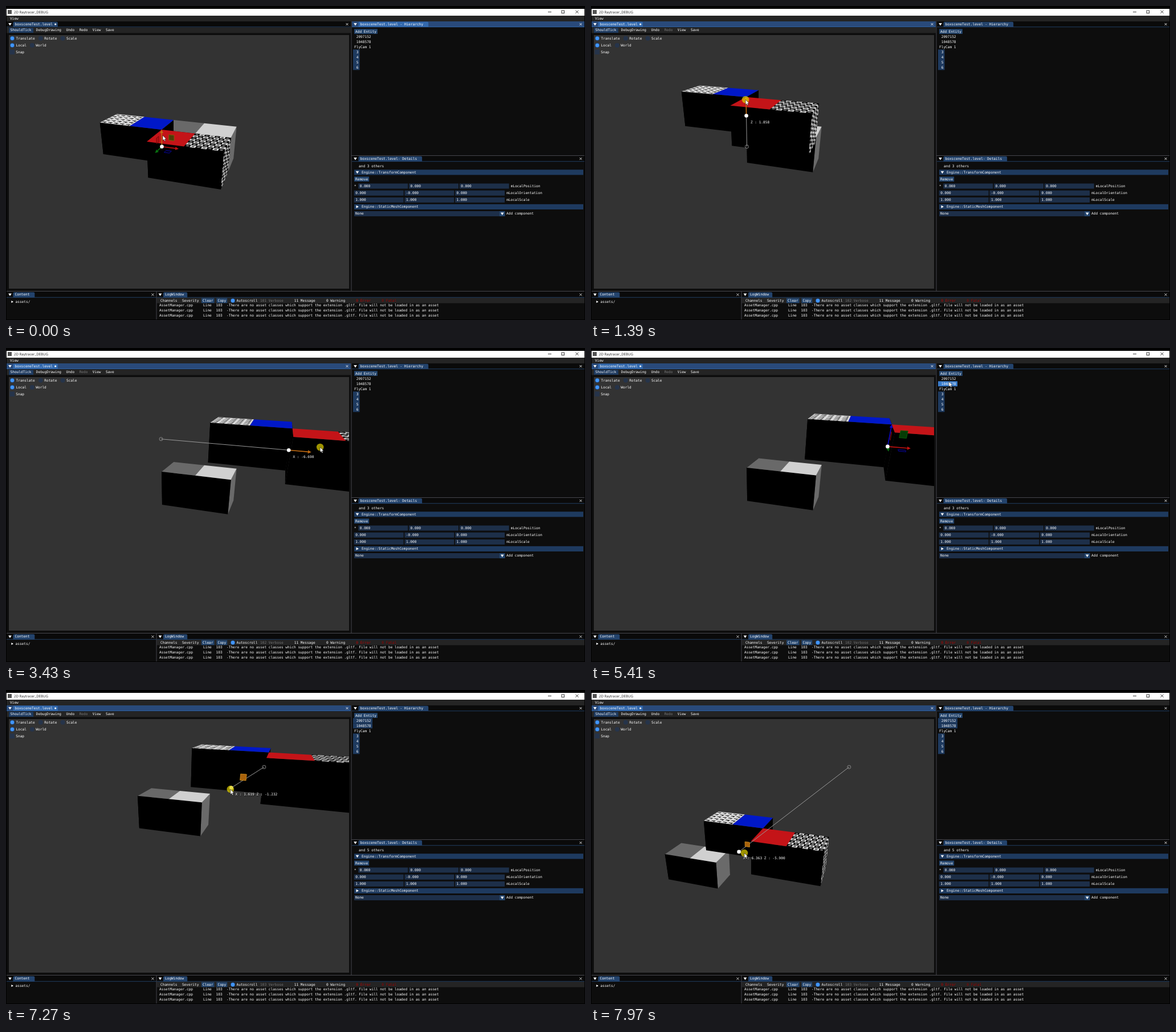
Recreate the animation shown at these times as an HTML page with a canvas. Size 1016 by 551 pixels, loop 8000 ms.

```html
<!DOCTYPE html>
<html lang="en">
<head>
<meta charset="utf-8">
<title>Level editor</title>
<style>
html, body { margin: 0; width: 100%; height: 100%; overflow: hidden; background: #000; }
canvas { display: block; }
</style>
</head>
<body>
<canvas id="stage" width="1016" height="551"></canvas>
<script>
const ctx = document.getElementById('stage').getContext('2d');
const MONO = '6.13px "DejaVu Sans Mono", monospace', CHAR = 3.69;
const FRAME = '#1d2f49', BUTTON = '#24456d', HEADER = '#1e3a5f', TAB = '#23436c', MENU = '#242424', HOT = '#c06a12';
const LOOP = 8000;

// ---------- timing ----------
const ramp = (t, from, to) => Math.min(1, Math.max(0, (t - from) / (to - from)));
const linear = p => p;
const easeOut = p => Math.sin(p * Math.PI / 2);
const LIFT = [710, 2250], SLIDE = [2720, 3690], FLY = [5410, 6200], PLANE = [6950, 7970];
const within = (t, [from, to]) => t >= from && t < to;

// ---------- drawing helpers ----------
function rect(x, y, w, h, color) {
  ctx.fillStyle = color;
  ctx.fillRect(x, y, w, h);
}
function text(s, x, y, color = '#fff', font = MONO) {
  ctx.font = font;
  ctx.fillStyle = color;
  ctx.fillText(s, x, y + .3);
}
// labels side by side; visit(label, x) draws one
function row(labels, x, gap, visit) {
  for (const label of labels) {
    visit(label, x);
    x += label.length * CHAR + gap;
  }
}
function poly(points, color, stroke, width = 1) {
  ctx.beginPath();
  points.forEach(p => ctx.lineTo(...p));
  ctx.closePath();
  ctx.fillStyle = color;
  ctx.fill();
  if (!stroke) return;
  ctx.strokeStyle = stroke;
  ctx.lineWidth = width;
  ctx.stroke();
}
function line(a, b, color, width = 1) {
  ctx.beginPath();
  ctx.moveTo(...a);
  ctx.lineTo(...b);
  ctx.strokeStyle = color;
  ctx.lineWidth = width;
  ctx.stroke();
}
function disc(x, y, r, color, outline) {
  ctx.beginPath();
  ctx.arc(x, y, r, 0, 7);
  ctx.lineWidth = 1;
  ctx.fillStyle = ctx.strokeStyle = color;
  outline ? ctx.stroke() : ctx.fill();
}
const down = (x, y) => poly([[x - 2.8, y - 2], [x + 2.8, y - 2], [x, y + 2.5]], '#fff');
const right = (x, y, r = 2.5) => poly([[x - r * .8, y - r], [x + r, y], [x - r * .8, y + r]], '#fff');
function cross(x, y, color = '#fff', r = 2) {
  line([x - r, y - r], [x + r, y + r], color, .8);
  line([x - r, y + r], [x + r, y - r], color, .8);
}
function button(label, x, y) {
  rect(x - 2, y - 4.4, label.length * CHAR + 4, 8.6, BUTTON);
  text(label, x, y);
}
function radio(label, x, y, on) {
  disc(x, y, 4, on ? '#1f4a80' : '#26344a');
  if (on) disc(x, y, 3.2, '#4296fa');
  text(label, x + 6.5, y);
}

// ---------- 3D scene, unit = one cube ----------
function project(u, v, z) {
  const w = 1 - .0293 * u - .106 * v - .053 * z;
  return [(273 + 49.3 * u - 52.2 * v - 15.5 * z) / w, (217 + .3 * u - 4.2 * v - 72.6 * z) / w];
}
const quad = (at, a0, b0, a1, b1, color) => poly([at(a0, b0), at(a1, b0), at(a1, b1), at(a0, b1)], color);
const flat = color => at => quad(at, 0, 0, 1, 1, color);
function cells(at, n, paint) {
  for (let i = 0; i < n; i++) for (let j = 0; j < n; j++)
    paint((a, b) => at((i + a) / n, (j + b) / n), (i + j) % 2);
}
function symbols(at) {
  flat('#dcdcdc')(at);
  cells(at, 5, cell => {
    quad(cell, .1, .35, .8, .58, '#111');
    quad(cell, .55, .58, .75, .85, '#111');
  });
}
function checker(at) {
  cells(at, 7, (cell, light) => {
    flat(light ? '#dcdcdc' : '#080808')(cell);
    quad(cell, .25, .35, .7, .65, light ? '#111' : '#ccc');
  });
}
function box([u, v, z], topLeft, topRight, side) {
  flat('#000')((a, b) => project(u, v + a, z - b));
  side((a, b) => project(u + 2, v + a, z - b));
  flat('#000')((a, b) => project(u + 2 * a, v + 1, z - b));
  topLeft((a, b) => project(u + a, v + b, z));
  topRight((a, b) => project(u + 1 + a, v + b, z));
}

function sceneAt(t) {
  const p = ramp(t, ...PLANE);
  const lift = 2.902 * easeOut(ramp(t, ...LIFT));
  const slide = 7.325 * easeOut(ramp(t, ...SLIDE));
  const planeX = 6.363 * p ** 1.184, planeZ = 5.9 * p ** 1.355;
  const fly = t < FLY[0] ? 0 : .11 + .89 * ramp(t, ...FLY);
  const world = [-.12 * fly - planeX * .5, -.4 * fly, .907 * fly - planeZ * .48];
  const moved = [slide * .5, 0, lift * .48];
  return { lift, slide, planeX, planeZ, world, moved };
}
const add = (a, b, k = 1) => a.map((n, i) => n + b[i] * k);

// ---------- transform gizmo ----------
function gizmo(pivot, mode, start, label) {
  const at = project(...pivot);
  const rel = (...d) => project(...add(pivot, d));
  const arrow = (end, color) => {
    const dx = end[0] - at[0], dy = end[1] - at[1], len = Math.hypot(dx, dy), x = dx / len, y = dy / len;
    const neck = [end[0] - 6 * x, end[1] - 6 * y];
    line(at, neck, color, 1.6);
    poly([end, add(neck, [-y, x], 3), add(neck, [y, -x], 3)], color);
  };
  const plane = (corner, fill, stroke) => {
    const lo = .22, hi = .38;
    poly([corner(lo, lo), corner(hi, lo), corner(hi, hi), corner(lo, hi)], fill, stroke, .9);
  };
  const xEnd = rel(.52, 0, 0), zEnd = rel(0, 0, .5), xz = (a, b) => rel(a, 0, b);
  if (start) {
    line(start, at, '#999');
    disc(...start, 3, '#888', true);
    if (mode === 'x') arrow(xEnd, HOT);
    if (mode === 'z') arrow(zEnd, HOT);
    if (mode === 'p') plane(xz, '#a8620c', '#c98a1c');
  } else {
    arrow(xEnd, mode === 'x' ? HOT : '#c01010');
    arrow(rel(0, .5, 0), '#087010');
    arrow(zEnd, mode === 'z' ? HOT : '#0808c8');
    plane((a, b) => rel(0, a, b), 'rgba(120,0,0,.2)', '#700808');
    plane((a, b) => rel(a, b, 0), 'rgba(0,0,120,.2)', '#0808a0');
    const hot = mode === 'z' || mode === 'p';
    plane(xz, hot ? '#4d3c08' : '#063c06', hot ? '#80600c' : '#0a600a');
  }
  disc(...at, 3.3, '#fff');
  if (label) {
    text(label, at[0] + 8, at[1] + 12.2, '#000');
    text(label, at[0] + 7.3, at[1] + 11.5);
  }
}

function viewport(t) {
  const { lift, slide, planeX, planeZ, world, moved } = sceneAt(t);
  const pair = add(world, moved);
  ctx.save();
  ctx.beginPath();
  ctx.rect(5, 51, 597, 445);
  ctx.clip();
  rect(5, 51, 597, 445, '#333');
  box(add(world, [0, -1, 0]), flat('#696969'), flat('#d0d0d0'), flat('#6a6a6a'));
  box(add(pair, [-2, -1, 0]), symbols, flat('#0018c8'), flat('#000'));
  box(pair, flat('#c41418'), checker, checker);

  // pivot = mean of the selected cubes: four at first, then all six
  const four = add(pair, [0, 0, -.5]);
  const six = (w, m) => add(add(w, m, 2 / 3), [1 / 3, -1 / 6, -.5]);
  const grab = sceneAt(PLANE[0]);
  if (within(t, [740, 2320])) gizmo(four, 'z', project(0, 0, -.5), `Z : ${lift.toFixed(3)}`);
  else if (within(t, [SLIDE[0], 4050])) gizmo(four, 'x', project(0, 0, moved[2] - .5), `X : ${(-slide).toFixed(3)}`);
  else if (t >= PLANE[0]) gizmo(six(world, moved), 'p', project(...six(grab.world, grab.moved)),
    `X : ${planeX.toFixed(3)} Z : ${(-planeZ).toFixed(3)}`);
  else gizmo(t < 5900 ? four : six(world, moved), t < 2500 ? 'z' : t < SLIDE[0] ? 'x' : t > 6600 ? 'p' : '');
  ctx.restore();
}

// ---------- mouse ----------
function mouseAt(t) {
  const legs = [
    [...LIFT, 269, 129, easeOut], [2390, 2660, 300, 163], [...SLIDE, 575, 175, easeOut], [4050, 4440, 628, 59],
    [6260, 6650, 480, 117], [PLANE[0], 7270, 394, 174], [7270, PLANE[1], 269, 286],
  ];
  let x = 275, y = 227;
  for (const [from, to, endX, endY, ease = linear] of legs) {
    const p = ease(ramp(t, from, to));
    x += (endX - x) * p;
    y += (endY - y) * p;
  }
  return [x, y];
}
function pointer(t) {
  const tip = mouseAt(t);
  if (within(t, [730, 2320]) || within(t, [SLIDE[0], 4050]) || t > PLANE[0]) disc(...tip, 6.3, 'rgba(220,205,0,.72)');
  const shape = [[0, 0], [0, 9], [2, 7.2], [3.4, 10.3], [4.9, 9.6], [3.6, 6.7], [6.2, 6.5]];
  poly(shape.map(p => add(p, tip)), '#fff', '#000', .5);
}

// ---------- panels ----------
function titleBar(label, x0, x1, y, focused, extra = 0) {
  const tab = focused ? '#3369ad' : TAB, width = label.length * CHAR + 9 + extra;
  rect(x0, y, x1 - x0, 10, focused ? '#294a7a' : '#0a0a0a');
  rect(x0, y + 9.3, x1 - x0, .9, tab);
  ctx.beginPath();
  ctx.roundRect(x0 + 11.5, y + .8, width, 9.2, [2, 2, 0, 0]);
  ctx.fillStyle = tab;
  ctx.fill();
  down(x0 + 6, y + 5);
  text(label, x0 + 14.5, y + 5);
  cross(x1 - 6.5, y + 5);
}
function levelPanel(t, focused) {
  titleBar('boxsceneTest.level', 1, 605, 27, focused, 3);
  disc(86.7, 32, 1.6, '#fff');
  rect(1, 37.5, 604, 10, MENU);
  rect(5, 38.5, 43, 8.5, HEADER);
  row(['ShouldTick', 'DebugDrawing', 'Undo', 'Redo', 'View', 'Save'], 7.5, 8.4,
    (s, x) => text(s, x, 42.5, s === 'Redo' && t >= 760 ? '#777' : '#fff'));
  viewport(t);
  row(['Translate', 'Rotate', 'Scale'], 11, 16.6, (s, x) => radio(s, x, 56.7, s === 'Translate'));
  row(['Local', 'World'], 11, 16.4, (s, x) => radio(s, x, 69, s === 'Local'));
  rect(6.5, 76.5, 8.5, 8.5, '#26344a');
  text('Snap', 17.3, 81);
}
function hierarchyPanel(t, focused) {
  titleBar('boxsceneTest.level - Hierarchy', 607, 1015, 27, focused, 3);
  button('Add Entity', 613, 44.7);
  if (t >= 5900) rect(609, 49.3, 34, 9, HEADER);
  if (t >= 4400) rect(609, 58.3, 34, 9, t < 5800 ? '#387bcb' : HEADER);
  rect(609, 76.3, 11.5, 36, HEADER);
  ['2097152', '1048578', 'FlyCam 1', '3', '4', '5', '6']
    .forEach((s, i) => text(s, i === 2 ? 611 : 614.7, 54 + 9 * i));
}
function component(label, y, open) {
  rect(611, y - 4.5, 402, 9.2, HEADER);
  open ? down(616.5, y) : right(616.5, y);
  text(label, 624, y);
}
function detailsPanel(t) {
  titleBar('boxsceneTest.level- Details', 607, 1015, 263, false, 3);
  text(`and ${t < 5500 ? 3 : t < 5900 ? 4 : 5} others`, 619, 281);
  component('Engine::TransformComponent', 291.7, true);
  button('Remove', 613, 303.8);
  text('*', 611, 316);
  ['mLocalPosition', 'mLocalOrientation', 'mLocalScale'].forEach((label, n) => {
    const x = n ? 610.7 : 618.3, y = 316 + 12.2 * n;
    for (let i = 0; i < 3; i++) {
      rect(x + i * 88.7, y - 4.5, 87, 9, FRAME);
      text(n === 2 ? '1.000' : n === 1 && i === 1 ? '-0.000' : '0.000', x + 2.5 + i * 88.7, y);
    }
    text(label, x + 267.5, y);
  });
  component('Engine::StaticMeshComponent', 352.3, false);
  rect(611, 360, 264.5, 9, FRAME);
  rect(866, 360, 9.5, 9, BUTTON);
  down(870.8, 364.4);
  text('None', 613, 364.5);
  text('Add component', 878, 364.5);
}
function bottomPanels(t) {
  titleBar('Content', 1, 264, 501.5, false, 3);
  right(11, 519, 2);
  text('assets/', 16.5, 519.3);
  titleBar('LogWindow', 264.5, 1015, 501.5, false);
  rect(264.5, 512, 750.5, 9.5, MENU);
  row(['Channels', 'Severity'], 271, 8.4, (s, x) => text(s, x, 517));
  row(['Clear', 'Copy'], 345, 8, (s, x) => button(s, x, 517));
  radio('Autoscroll', 398, 517, true);
  const colors = { Verbose: '#777', Error: '#b00', Fatal: '#900' };
  row([`${t < 760 ? 101 : t < 6990 ? 102 : 103} Verbose`, '11 Message', '0 Warning', '0 Error', '0 Fatal'], 446, 19.2,
    (s, x) => text(s, x, 517, colors[s.split(' ')[1]]));
  for (let y = 525; y < 550; y += 9) {
    text('AssetManager.cpp', 269, y);
    text('Line', 346, y);
    text('103', 368.5, y);
    text('-There are no asset classes which support the extension .gltf. File will not be loaded in as an asset', 387, y);
  }
}
function windowFrame() {
  rect(0, 0, 1016, 551, '#000');
  rect(1, 17, 1014, 533, '#0d0d0d');
  rect(1, 5, 1014, 12, '#fff');
  rect(3, 7, 7, 7, '#555');
  text('2D Raytracer_DEBUG', 14, 11, '#222', '6.1px "Open Sans", sans-serif');
  line([951, 10.5], [957, 10.5], '#111', .8);
  ctx.strokeRect(975, 8, 4.6, 4.6);
  cross(1002, 10.3, '#111', 2.6);
  rect(1, 17, 1014, 10, MENU);
  text('View', 7, 22);
}

function draw(t) {
  ctx.textBaseline = 'middle';
  ctx.textRendering = 'geometricPrecision';
  const hierarchyFocus = t < 510 || within(t, [5470, PLANE[0]]);
  windowFrame();
  levelPanel(t, !hierarchyFocus);
  hierarchyPanel(t, hierarchyFocus);
  detailsPanel(t);
  bottomPanels(t);
  rect(605.5, 27, 1, 474, '#45454c');
  rect(606, 262, 409, 1, '#45454c');
  rect(1, 500, 1014, 1, '#45454c');
  rect(263.5, 500, 1, 50, '#45454c');
  pointer(t);
}

function tick() {
  draw(performance.now() % LOOP);
  requestAnimationFrame(tick);
}
tick();
</script>
</body>
</html>
```
